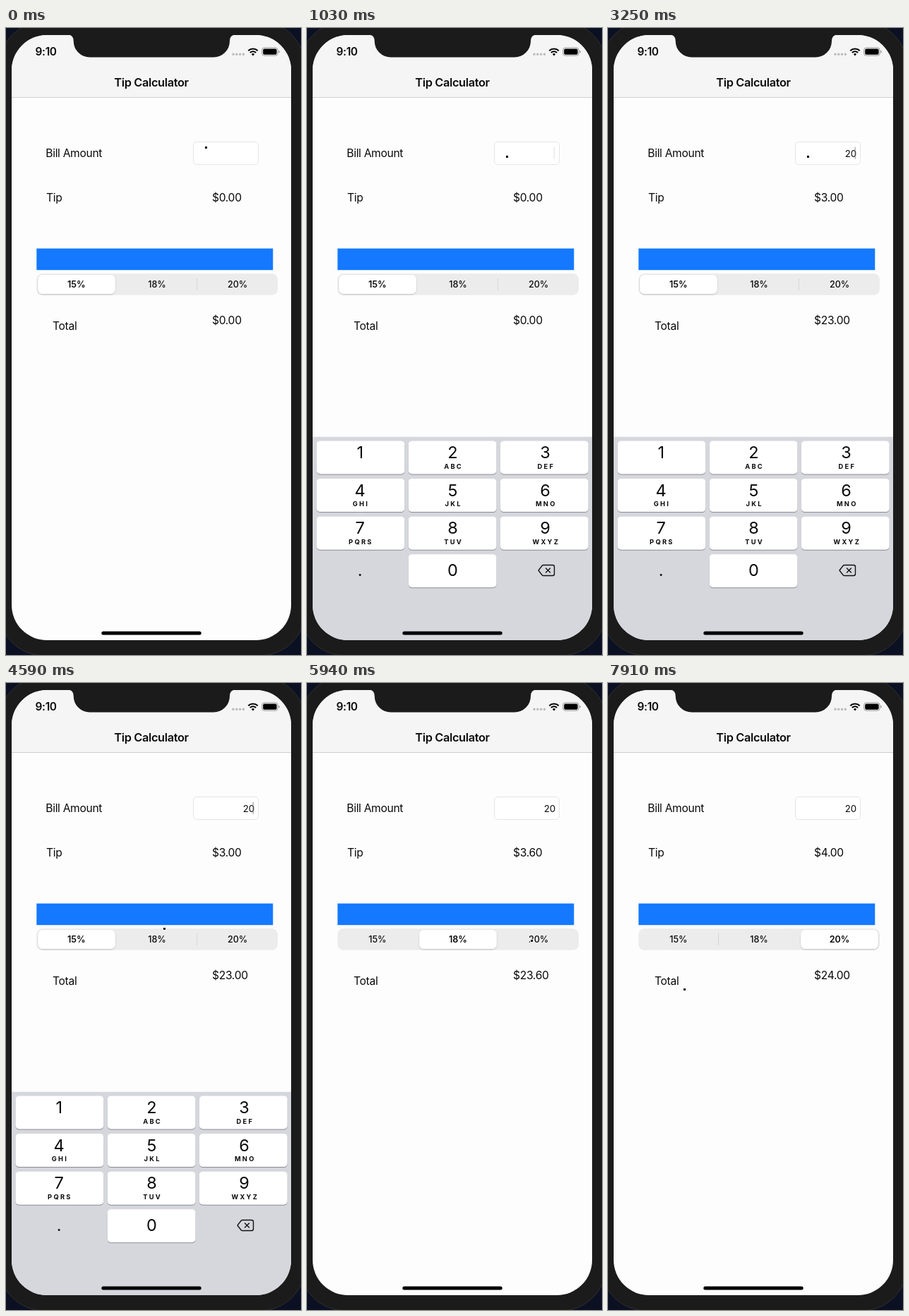
Recreate the animation shown at these times as an HTML page. Size 418x889 px, loop 8 s.

```html
<!DOCTYPE html>
<html lang="en">
<head>
<meta charset="utf-8">
<title>Tip Calculator</title>
<style>
  html, body { margin: 0; width: 100%; height: 100%; overflow: hidden; background: #0b1022; }
  svg { display: block; width: 100vw; height: 100vh; }
  text { font-family: Inter, "Liberation Sans", sans-serif; fill: #0a0a0a; }
  .label { font-size: 15.6px; letter-spacing: -.02em; }
  .title { font-size: 16.3px; font-weight: 600; letter-spacing: -.02em; }
  .clock { font-size: 15.4px; font-weight: 600; letter-spacing: -.02em; }
  .field { font-size: 13.3px; }
  .segment { font-size: 12.6px; font-weight: 500; }
  .digit { font-size: 23.5px; }
  .letters { font-size: 9.3px; font-weight: 700; letter-spacing: 2.3px; }
  .mid { text-anchor: middle; }
  .end { text-anchor: end; }
</style>
</head>
<body>
<svg viewBox="0 0 418 889">
  <defs>
    <clipPath id="screen"><rect x="8" y="10" width="396" height="858" rx="50"/></clipPath>
    <filter id="shadow" x="-10%" y="-20%" width="120%" height="150%">
      <feDropShadow dx="0" dy="1" stdDeviation="1.3" flood-opacity=".2"/>
    </filter>
  </defs>

  <rect x="-10" y="-9" width="434" height="899" rx="64" fill="#1b1b1b" stroke="#303030"/>

  <g clip-path="url(#screen)">
    <rect x="8" y="10" width="396" height="858" fill="#fdfdfd"/>
    <rect x="8" y="10" width="396" height="88" fill="#f5f5f5"/>
    <rect x="8" y="98" width="396" height="1" fill="#cecece"/>
    <text class="title mid" x="206" y="83">Tip Calculator</text>

    <text class="label" x="56.3" y="183">Bill Amount</text>
    <rect x="265.5" y="161.5" width="92" height="32" rx="4.5" fill="#fff" stroke="#e5e5e5"/>
    <text class="field end" id="bill" x="352.2" y="182.6"></text>
    <rect id="caret" x="349.3" y="168.5" width="2" height="17.5" rx="1" fill="#777"/>

    <text class="label" x="57" y="246">Tip</text>
    <text class="label" id="tip" x="292" y="246"></text>
    <rect x="43.3" y="312.6" width="335" height="30.6" fill="#1479ff"/>

    <rect x="43.3" y="348.3" width="341.7" height="30.4" rx="8" fill="#ececed"/>
    <g id="separators" fill="#d6d6d8"></g>
    <rect id="thumb" y="350" width="109.5" height="27" rx="6.5" fill="#fff" filter="url(#shadow)"/>
    <g id="segments"></g>

    <text class="label" x="66" y="427.5">Total</text>
    <text class="label" id="total" x="292" y="420"></text>

    <g id="keyboard">
      <rect x="8" y="579.7" width="396" height="290" fill="#d6d7dd"/>
      <g id="keys"></g>
      <path d="M335 761.5H348q2.5 0 2.5 2.5V774q0 2.5-2.5 2.5H335q-1 0-1.8-.8L328.5 769.8q-.7-.8 0-1.6L333.2 762.3q.8-.8 1.8-.8ZM338.5 766l6 6m0-6l-6 6"
            fill="none" stroke="#111" stroke-width="1.4" stroke-linecap="round" stroke-linejoin="round"/>
    </g>
    <rect x="135.3" y="855.4" width="141.4" height="5" rx="2.5"/>
  </g>

  <path fill="#1b1b1b" d="M88 9.5Q95.7 10 95.7 18.6A23 23 0 0 0 118.7 41.6H294A23 23 0 0 0 317 18.6Q317 10 325 9.5Z"/>
  <text class="clock" x="41.5" y="39.3">9:10</text>
  <path d="M322 37.3h15" stroke="#b9b9b9" stroke-width="3.4" stroke-linecap="round" stroke-dasharray="0 4.8"/>
  <g fill="none" stroke="#000" stroke-width="2.1">
    <path d="M343.3 32.2a9.6 9.6 0 0 1 13.4 0M345.9 35a5.8 5.8 0 0 1 8.2 0"/>
    <path d="M350 39.4l-2.1-2.3a3 3 0 0 1 4.2 0Z" fill="#000" stroke="none"/>
  </g>
  <rect x="362.7" y="28" width="22.4" height="11.2" rx="3.2" fill="none" stroke="#999"/>
  <rect x="364.2" y="29.5" width="19.4" height="8.2" rx="1.9"/>
  <path d="M386.4 31.8q1.6.4 1.6 1.8t-1.6 1.8Z" fill="#999"/>

  <rect id="pointer" x="-2" y="-2" width="4" height="4" stroke="#fff"/>
</svg>

<script>
const LOOP = 8000;
const RATES = [15, 18, 20];
const FOCUS = 1030, TYPE_2 = 2510, TYPE_0 = 2750, DISMISS = 4640;
const PICKS = [5070, 6060];

// Pointer gestures: start, end, destination
const HOME = [283.5, 169.5];
const GESTURES = [
  [400, 520, 283.5, 182.5],   // into the bill field
  [3250, 3970, 226.5, 330],   // down to the segments
  [4110, 4950, 223.5, 362.5],
  [5250, 5690, 318.5, 365.5], // across to 20%
  [6250, 6540, 296.5, 402.5], // towards the total
  [7430, 7910, 108.5, 434.5]
];

const $ = id => document.getElementById(id);
const clamp = v => Math.min(1, Math.max(0, v));
const progress = (t, start, end) => clamp((t - start) / (end - start));
const easeOut = p => 1 - (1 - p) ** 3;

function add(parent, name, attrs, content = "") {
  const el = document.createElementNS("http://www.w3.org/2000/svg", name);
  for (const key in attrs) el.setAttribute(key, attrs[key]);
  el.textContent = content;
  return parent.appendChild(el);
}

const segments = RATES.map((rate, i) =>
  add($("segments"), "text", { class: "segment mid", x: 99.9 + 114.1 * i, y: 368 }, rate + "%"));
const separators = [156, 270].map(x =>
  add($("separators"), "rect", { x, y: 355, width: 1, height: 17 }));

["1", "2ABC", "3DEF", "4GHI", "5JKL", "6MNO", "7PQRS", "8TUV", "9WXYZ", ".", "0"].forEach((key, i) => {
  const column = i % 3, keys = $("keys");
  const x = 13.5 + 130.2 * column, y = 585.5 + 53.6 * Math.floor(i / 3);
  const center = 75.2 + 131.2 * column;
  if (key !== ".") {
    add(keys, "rect", { x, y: y + 1, width: 124.8, height: 47, rx: 5, fill: "#8b8c91" });
    add(keys, "rect", { x, y, width: 124.8, height: 47, rx: 5, fill: "#fff" });
  }
  const baseline = i < 9 ? 24.7 : 31;
  add(keys, "text", { class: "digit mid", x: center, y: y + baseline }, key[0]);
  add(keys, "text", { class: "letters mid", x: center + 1.2, y: y + 39 }, key.slice(1));
});

function pointerAt(t) {
  return GESTURES.reduce(([x, y], [start, end, toX, toY]) => {
    const p = progress(t, start, end);
    return [x + (toX - x) * p, y + (toY - y) * p];
  }, HOME);
}

function caretAlpha(t) {
  if (t < FOCUS || t > DISMISS) return 0;
  const lastInput = [TYPE_0, TYPE_2, FOCUS].find(at => t >= at);
  return clamp(.5 + 1.2 * Math.cos((t - lastInput - 270) / 900 * 2 * Math.PI));
}

function draw(t) {
  const bill = t < TYPE_2 ? "" : t < TYPE_0 ? "2" : "20";
  const selected = PICKS.filter(at => t >= at).length;
  const tip = bill * RATES[selected] / 100;
  $("bill").textContent = bill;
  $("tip").textContent = "$" + tip.toFixed(2);
  $("total").textContent = "$" + (+bill + tip).toFixed(2);

  segments.forEach((el, i) => el.style.fontWeight = i === selected ? 600 : 500);
  separators.forEach((el, i) => el.style.opacity = selected === i || selected === i + 1 ? 0 : 1);
  const slide = PICKS.reduce((sum, at) => sum + easeOut(progress(t, at, at + 320)), 0);
  $("thumb").setAttribute("x", 45.2 + 114 * slide);

  $("caret").style.opacity = caretAlpha(t);
  const drop = t < FOCUS ? 1 : easeOut(progress(t, DISMISS, DISMISS + 400));
  $("keyboard").setAttribute("transform", `translate(0 ${289 * drop})`);
  const [x, y] = pointerAt(t).map(v => Math.floor(v) + .5);
  $("pointer").setAttribute("transform", `translate(${x} ${y})`);
}

function frame() {
  draw(performance.now() % LOOP);
  requestAnimationFrame(frame);
}
frame();
</script>
</body>
</html>
```
